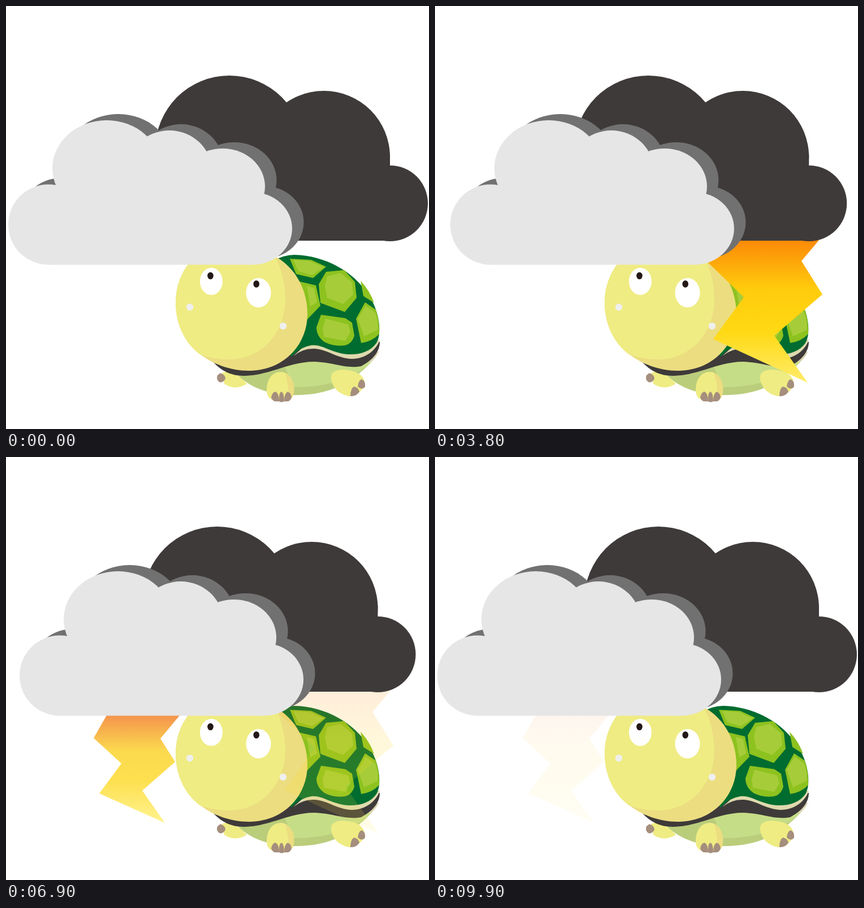
Animation, 748 px wide and 748 px high, one loop 10000 ms. Source, as an HTML page:

```html
<!DOCTYPE html>
<html lang="en">
<head>
<meta charset="utf-8">
<title>Turtle in a thunderstorm</title>
<style>
  html, body { margin: 0; width: 100%; height: 100%; overflow: hidden; background: #fff; }
  svg { display: block; width: 100vw; height: 100vh; }
  .skin { fill: #efec83; }
  .skin-shade { fill: #ecdd80; }
  .claw { fill: #a58e7d; }
  .scute { fill: #8dc21f; }
  .scute-light { fill: #a6cd39; }
  .storm { fill: #3e3a39; }
</style>
</head>
<body>
<svg viewBox="0 0 748 748">
  <defs>
    <linearGradient id="leftGlow" gradientUnits="userSpaceOnUse" x1="0" y1="457" x2="0" y2="647">
      <stop offset="0" stop-color="#f3883a"/>
      <stop offset=".33" stop-color="#fbd63c"/>
      <stop offset=".6" stop-color="#fddc3c"/>
      <stop offset="1" stop-color="#fff284"/>
    </linearGradient>
    <linearGradient id="rightGlow" gradientUnits="userSpaceOnUse" x1="0" y1="410" x2="0" y2="666">
      <stop offset="0" stop-color="#fc8608"/>
      <stop offset=".35" stop-color="#ffcb0c"/>
      <stop offset=".65" stop-color="#ffd914"/>
      <stop offset="1" stop-color="#ffec6a"/>
    </linearGradient>
    <clipPath id="underLight"><rect y="455" width="748" height="293"/></clipPath>
    <clipPath id="underDark"><rect y="414" width="748" height="334"/></clipPath>
    <g id="cloud">
      <circle cx="75" cy="386.500" r="71"/>
      <ellipse cx="178" cy="287" rx="96" ry="85"/>
      <ellipse cx="289" cy="292" rx="75" ry="72"/>
      <ellipse cx="383" cy="319" rx="75" ry="67"/>
      <ellipse cx="436" cy="393.500" rx="70" ry="64"/>
      <rect x="75" y="320" width="361" height="137.500"/>
    </g>
  </defs>

  <g clip-path="url(#underLight)">
    <polygon id="leftBolt" fill="url(#leftGlow)"
      points="332,427 273,498 299,539 241,590 281,647 165,595 204,542 155,497 195,427"/>
  </g>

  <g id="turtle">
    <!-- belly and hind foot -->
    <path class="skin" d="M382 649Q400 640 426 668Q405 681 386 668Z"/>
    <path class="claw" d="M379 649Q388 652 388 659Q384 667 377 665Q371 660 374 653Z"/>
    <path fill="#d9d4b0" d="M635 630L660 610Q655 623 630 645Z"/>
    <path fill="#bacd7b" d="M405 648C430 675 465 688 512 688C570 688 610 668 645 630L560 620Z"/>
    <path fill="#c6dd87" d="M490 630L560 620L645 630Q630 645 612 654Q570 674 508 674Z"/>
    <!-- shell rim -->
    <path class="storm" d="M366 629Q388 654 420 654C465 654 500 629 545 629C580 630 600 642 628 637Q661 619 661 594L540 595L470 600Z"/>
    <path fill="#dedaae" d="M508 619Q525 605 546 606C570 608 585 623 612 624C635 624 655 609 661 590L540 590Z"/>
    <path fill="#006c2f" d="M470 452Q490 440 510 440C590 442 655 500 660 565C661 580 659 589 655 596C645 611 625 617 605 616C575 614 560 598 540 600Q520 603 505 620L450 560Z"/>
    <g class="scute">
      <path d="M502 447L540 449L566 461L543 481L513 474Z"/>
      <path d="M566 470L598 467L617 488L620 516L599 541L556 525L553 492Z"/>
      <path d="M518 487L548 494L556 530L530 557Z"/>
      <path d="M557 546L600 552L612 560L616 583Q612 597 600 600Q580 603 563 594Q549 584 549 568Z"/>
      <path d="M635 524L654 537Q661 558 660 580Q648 593 628 596L619 553Z"/>
      <path d="M627 486Q643 503 651 525L632 513Z"/>
    </g>
    <g class="scute-light">
      <path d="M508 449L537 451L562 462L541 476L517 469Z"/>
      <path d="M568 478L592 472L612 489L614 510L596 527L568 516L564 495Z"/>
      <path d="M532 495L545 499L550 524L538 531Z"/>
      <path d="M565 553L605 563L609 577L600 592L562 585L560 570Z"/>
      <path d="M636 530L653 542Q659 558 657 573L633 584L622 553Z"/>
    </g>
    <!-- front feet -->
    <path class="skin" d="M461 683C460 664 468 647 486 647C502 647 510 665 509 684Q507 695 497 697H474Q463 695 461 683Z"/>
    <path class="skin-shade" d="M493 649C507 655 511 670 509 684Q507 695 499 697Q501 670 493 649Z"/>
    <path class="claw" d="M469 692Q471 682 477 682Q483 686 483 699Q471 701 469 692Z"/>
    <path class="claw" d="M483 699Q482 684 487 682Q492 684 492 699Q487 702 483 699Z"/>
    <path class="claw" d="M492 699Q492 685 498 682Q504 684 505 692Q503 701 492 699Z"/>
    <path class="skin" d="M575 654C578 641 603 640 622 649Q636 657 634 672Q623 689 609 690C590 689 573 672 575 654Z"/>
    <path class="claw" d="M622 673Q623 662 629 660Q636 663 635 673Q630 680 622 673Z"/>
    <path class="claw" d="M609 690Q609 677 615 673Q623 674 625 682Q619 691 609 690Z"/>
    <!-- head -->
    <path class="skin-shade" d="M322 457C308 475 300 500 300 524C300 565 318 598 345 617C365 632 395 645 430 645C490 645 533 600 533 545C533 500 510 462 478 444L400 425Z"/>
    <path class="skin" d="M322 457C308 475 300 500 300 524C300 565 318 598 343 616Q367 625 395 625C450 625 493 580 494 520Q494 480 477 444L400 425Z"/>
    <g fill="#fff">
      <ellipse cx="363" cy="487" rx="20" ry="24"/>
      <ellipse cx="446.500" cy="507" rx="22" ry="26"/>
    </g>
    <g fill="#231815">
      <ellipse cx="361.500" cy="477" rx="5.300" ry="6.300"/>
      <ellipse cx="442.700" cy="491.500" rx="5.300" ry="6.300"/>
    </g>
    <g fill="#efefef">
      <circle cx="325" cy="532.500" r="6.200"/>
      <circle cx="490" cy="566" r="6.200"/>
    </g>
  </g>

  <g clip-path="url(#underDark)">
    <polygon id="rightBolt" fill="url(#rightGlow)"
      points="700,389 648,451 685,510 600,583 659,666 492,589 546,515 478,449 515,385"/>
  </g>

  <g id="darkCloud" class="storm">
    <circle cx="395" cy="254" r="131"/>
    <circle cx="562" cy="267" r="117"/>
    <circle cx="679" cy="349" r="67"/>
    <rect x="395" y="262" width="284" height="153"/>
  </g>
  <g id="lightCloud">
    <use href="#cloud" x="20.500" y="-11" fill="#727171"/>
    <use href="#cloud" fill="#e6e6e6"/>
  </g>
</svg>
<script>
  const LOOP = 10000, STEP = 100, DRIFT_END = 9900;
  const FALL_SPEED = 0.22, FADE = 3650;
  const el = id => document.getElementById(id);
  const shift = (id, x, y) => el(id).setAttribute('transform', `translate(${x} ${y})`);

  // Steady drift out to a peak and back again.
  const drift = (t, peak, reach) =>
    reach * (t < peak ? t / peak : (DRIFT_END - t) / (DRIFT_END - peak));

  // A bolt drops out of its cloud, lands, then fades away.
  function strike(id, t, land) {
    shift(id, 0, Math.min(0, (t - land) * FALL_SPEED));
    el(id).setAttribute('opacity', Math.max(0, Math.min(1, 1 - (t - land) / FADE)));
  }

  function draw(now) {
    const t = Math.floor(now % LOOP / STEP) * STEP;
    shift('lightCloud', drift(t, 5200, 31.4), 0);
    shift('darkCloud', drift(t, 6000, -28), 0);
    strike('rightBolt', t, 3800);
    strike('leftBolt', t, 6550);
  }

  const start = performance.now();
  function tick() {
    draw(performance.now() - start);
    requestAnimationFrame(tick);
  }
  tick();
</script>
</body>
</html>
```
